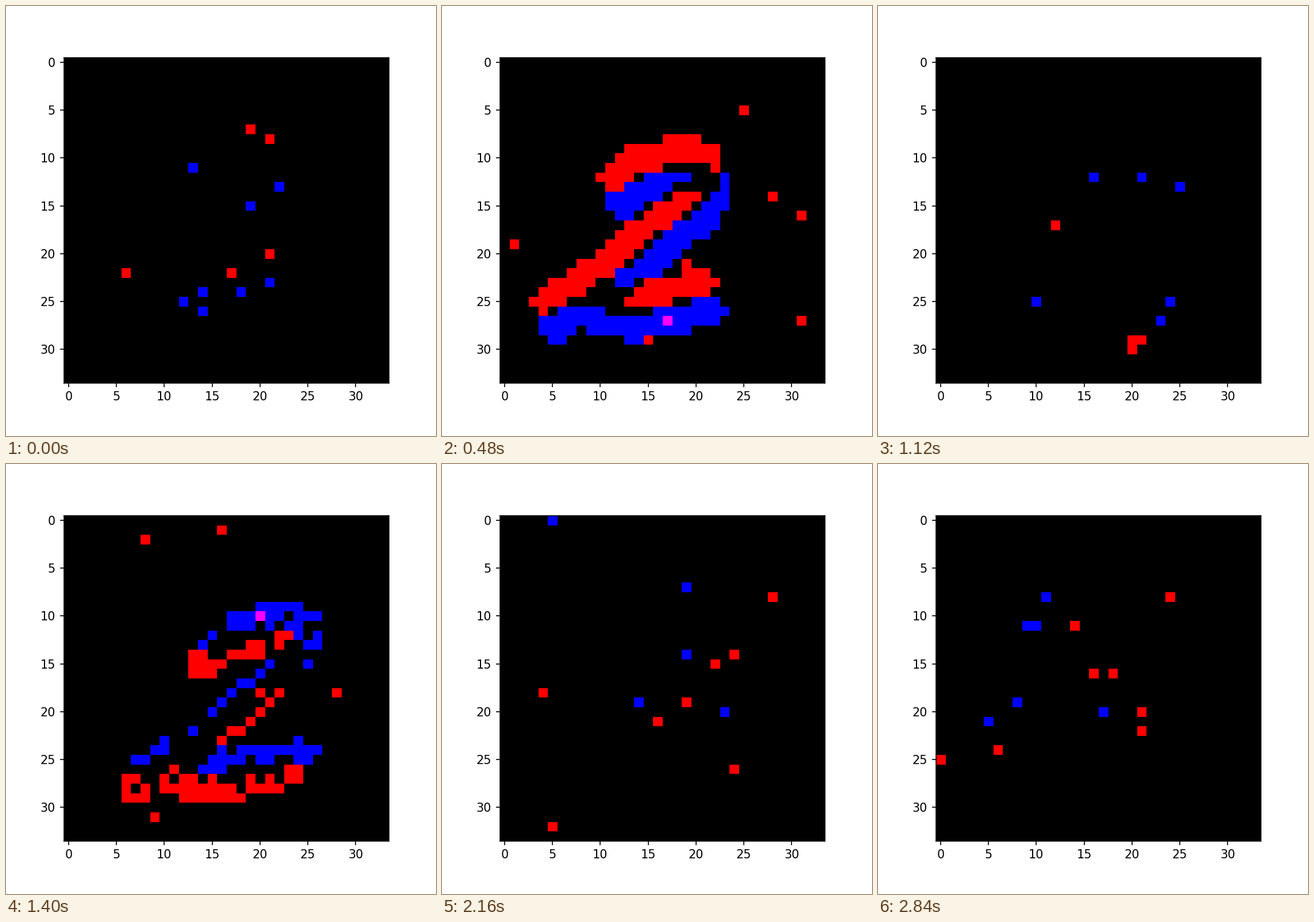
A matplotlib script that plays this animation: 748 by 748 pixels, repeating every 2880 ms.

```python
import numpy as np
import matplotlib.pyplot as plt
from matplotlib.animation import FuncAnimation

STAGE = 748
LEFT, TOP, SIDE = 100.52, 89.62, 565.9   # plot box in pixels
SIZE = 34            # sensor cells per side
STEPS = 24           # frames per saccade
FRAMES, INTERVAL = 3 * STEPS, 40

# Centre lines of the digit and the corners of its path over the sensor.
HOOK = [(11.8, 14), (14.5, 12), (17.5, 11.3), (20.3, 11.2), (21.7, 12.3),
        (20.9, 14.7), (17.6, 17.4), (10.5, 23.3), (4.9, 26.6)]
FOOT = [(8.5, 25.6), (13.3, 26.7), (17.5, 25.7), (21, 25)]
CORNERS = np.array([(-0.7, -2.7), (1, 2.5), (5.5, -3.8), (-0.5, -3.8)])
PEAKS = (1.15, 0.9, 0.8)     # strength of each burst of events
RADIUS, LAG = 1.6, 1.45

gy, gx = np.mgrid[:SIZE, :SIZE]


def digit(shift):
    """Cells covered by the digit moved by shift."""
    mask = np.zeros((SIZE, SIZE), bool)
    for line in (HOOK, FOOT):
        pts = np.array(line) + shift
        for (ax, ay), (bx, by) in zip(pts[:-1], pts[1:]):
            dx, dy = bx - ax, by - ay
            t = ((gx - ax) * dx + (gy - ay) * dy) / (dx * dx + dy * dy)
            t = np.clip(t, 0, 1)
            mask |= np.hypot(gx - ax - t * dx, gy - ay - t * dy) <= RADIUS
    return mask


def event_rate(part, step):
    """Chance that an edge cell fires: quick rise, slower fall."""
    width = 2.2 if step < 12 else 4.8
    bell = np.exp(-0.5 * ((step - 12) / width) ** 2)
    return 0.06 + PEAKS[part] * bell


def add_noise(layer, mean, rng):
    x, y = rng.integers(0, SIZE, (2, rng.poisson(mean)))
    layer[y, x] = 1


def events(frame):
    part, step = divmod(frame, STEPS)
    start, end = CORNERS[part], CORNERS[part + 1]
    t = np.clip((step - 2) / 22, 0, 1)
    place = start + (end - start) * t * t * (3 - 2 * t)
    lag = LAG * (end - start) / np.hypot(*(end - start))
    old, new = digit(place - lag), digit(place + lag)

    # Cells the digit leaves turn red, cells it enters turn blue.
    rng = np.random.default_rng(100 + frame)
    rate = event_rate(part, step)
    fired = rng.random((2, SIZE, SIZE)) < rate
    img = np.zeros((SIZE, SIZE, 3))
    off, on = img[..., 0], img[..., 2]
    off[old & ~new & fired[0]] = 1
    on[new & ~old & fired[1]] = 1
    add_noise(off, 0.7 + 4 * rate, rng)
    add_noise(on, 0.4, rng)
    return img


fig = plt.figure(figsize=(5, 5), dpi=STAGE / 5, facecolor="white")
ax = fig.add_axes([LEFT / STAGE, 1 - (TOP + SIDE) / STAGE,
                   SIDE / STAGE, SIDE / STAGE])
picture = ax.imshow(events(0), interpolation="nearest")
ax.set_xticks(range(0, SIZE, 5))
ax.set_yticks(range(0, SIZE, 5))


def update(frame):
    picture.set_data(events(frame))
    return [picture]


anim = FuncAnimation(fig, update, frames=FRAMES, interval=INTERVAL,
                     repeat=True, repeat_delay=0)
plt.show()
```
